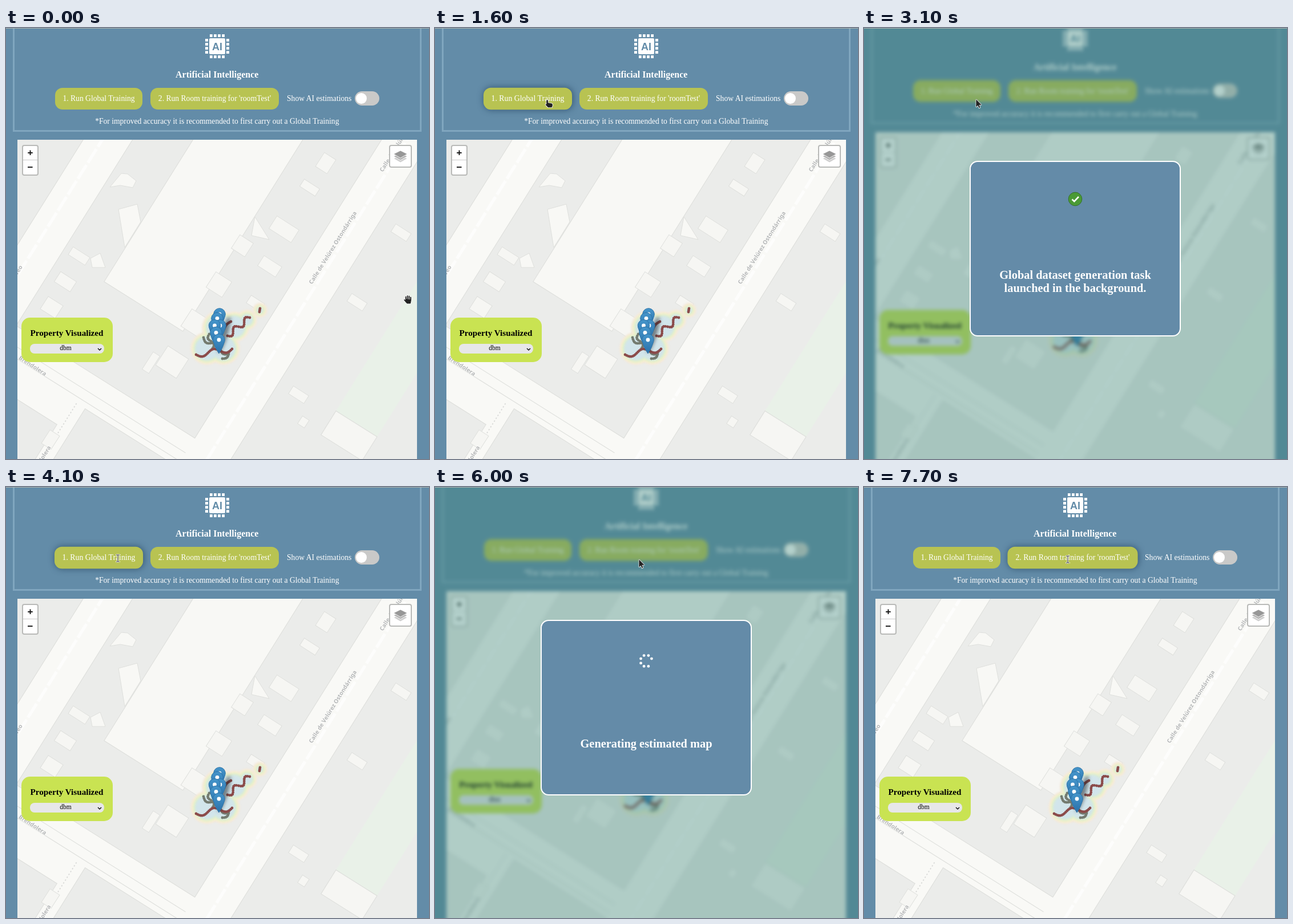
Animation of 741 by 756 pixels, one loop 8 s. Source, as an HTML page with a canvas:

```html
<!DOCTYPE html>
<html lang="en">
<head>
<meta charset="utf-8">
<title>Artificial Intelligence panel</title>
<style>
  html, body { margin: 0; width: 100%; height: 100%; overflow: hidden; background: #638ca8; }
  body { position: relative; font-family: "Liberation Serif", "Times New Roman", serif; font-size: 13.6px; color: #fff; }
  div, canvas, svg { position: absolute; box-sizing: border-box; }
  #page { left: 0; top: 0; width: 741px; height: 790px; background: #638ca8; }
  #page.away { filter: blur(3.4px); transform: translateY(-13.5px); }
  #map { left: 20px; top: 196px; width: 700px; height: 594px; overflow: hidden; }
  #map canvas { left: 0; top: 0; }
  .t { white-space: nowrap; line-height: 1; transform: translate(-50%, -50%); }
  .label { font: 600 10px "Noto Sans", sans-serif; color: #b4b6b6; text-shadow: 0 0 2px #fff, 0 0 2px #fff; }
  .bold { font-weight: bold; }
  .big { font-weight: bold; font-size: 20.4px; }
  .sign { font: bold 17px "Liberation Sans", Arial, sans-serif; color: #111; }
  #frame { left: 12px; top: -8px; width: 716px; height: 190px; border: 3px solid #80a6bf; }
  .btn { top: 104.5px; height: 38px; border-radius: 13px; background: #b8c352; line-height: 38px; text-align: center; white-space: nowrap; }
  .btn.over { transform: scale(1.014); box-shadow: 1px 0 10px 1px rgba(30, 60, 90, .6); }
  #switch { left: 611px; top: 111px; width: 42.5px; height: 25px; border-radius: 13px; background: #c9c9c8; }
  #switch div { left: 2px; top: 3px; width: 19px; height: 19px; border-radius: 50%; background: #fff; }
  .ctl { background: #fff; border: 2px solid #b9bab8; border-radius: 4px; }
  #panel { left: 26.5px; top: 507.5px; width: 160px; height: 78px; border-radius: 15px; background: #c9e352; color: #000; }
  #pick { left: 15px; top: 46px; width: 130px; height: 17px; border-radius: 8px; background: #e7e7e9; }
  #veil { inset: 0; background: rgba(55, 132, 118, .38); }
  #modal { left: 185px; top: 232.5px; width: 370px; height: 308px; border: 2px solid #fff; border-radius: 14px; background: #648ba8; }
  #edge { left: 0; top: 0; width: 100%; height: 1px; background: #aab2ae; }
  #cursor { left: 0; top: 0; overflow: visible; stroke-linecap: round; stroke-linejoin: round; }
</style>
</head>
<body>
<div id="page">
  <div id="frame"></div>
  <svg id="chip" width="42" height="42" style="left:348.5px;top:10.5px" fill="#fff">
    <rect x="7" y="7" width="28" height="28" rx="2"/>
    <text x="21" y="27.5" text-anchor="middle" fill="#638ca8" font-size="18" font-weight="bold" font-family="Liberation Sans, Arial, sans-serif">AI</text>
  </svg>
  <div class="btn" id="b1" style="left:86px;width:153px">1. Run Global Training</div>
  <div class="btn" id="b2" style="left:253px;width:225px">2. Run Room training for 'roomTest'</div>
  <div id="switch"><div></div></div>
  <div id="map"><canvas id="ground" width="700" height="594"></canvas></div>
  <div class="ctl" style="left:28px;top:204.5px;width:29px;height:54px"></div>
  <div style="left:30px;top:231px;width:25px;height:1px;background:#ccc"></div>
  <div class="ctl" style="left:670.5px;top:204.5px;width:40.5px;height:40px"></div>
  <svg width="24" height="24" style="left:679px;top:214px" stroke="#fff" stroke-width=".8">
    <path fill="#cfcfcf" d="M0 15 12 9 24 15 12 22z"/>
    <path fill="#b4b4b4" d="M0 11 12 5 24 11 12 18z"/>
    <path fill="#979797" d="M0 7 12 1 24 7 12 14z"/>
  </svg>
  <div id="panel">
    <div id="pick"></div>
    <svg width="8" height="6" style="left:133px;top:53px" fill="none" stroke="#111" stroke-width="1.5"><path d="M1 1 4 4 7 1"/></svg>
  </div>
</div>
<div id="veil"></div>
<div id="modal">
  <svg id="done" width="30" height="30" style="left:168px;top:50px">
    <circle cx="15" cy="15" r="11.8" fill="#4a9a35" stroke="#34702a"/>
    <path d="M9.5 15.5 13.3 19.2 21 11" fill="none" stroke="#fff" stroke-width="2.6"/>
  </svg>
  <svg id="spin" width="30" height="30" style="left:168px;top:55px" fill="#fff"></svg>
</div>
<div id="edge"></div>
<svg id="cursor" width="1" height="1"></svg>
<script>
const $ = id => document.getElementById(id);
const LOOP = 8000;

function text(parent, x, y, str, cls = '', size = '', turn = 0) {
  const el = document.createElement('div');
  el.className = 't ' + cls;
  el.textContent = str;
  Object.assign(el.style, { left: x + 'px', top: y + 'px', fontSize: size });
  if (turn) el.style.transform = `translate(-50%,-50%) rotate(${turn}deg)`;
  parent.append(el);
  return el;
}

function shape(parent, tag, attrs) {
  const el = document.createElementNS('http://www.w3.org/2000/svg', tag);
  for (const k in attrs) el.setAttribute(k, attrs[k]);
  parent.append(el);
  return el;
}

// Header, panel and dialog
const page = $('page'), modal = $('modal');
text(page, 369.7, 81.5, 'Artificial Intelligence', 'bold', '16px');
text(page, 548.7, 124, 'Show AI estimations');
text(page, 369.8, 164, '*For improved accuracy it is recommended to first carry out a Global Training');
text(page, 42.5, 219, '+', 'sign');
text(page, 42.5, 245, '\u2212', 'sign');
text($('panel'), 80, 27, 'Property Visualized', 'bold', '15.15px');
text($('panel'), 78, 54.5, 'dbm', '', '11.5px');
const doneText = [
  text(modal, 183, 198, 'Global dataset generation task', 'big'),
  text(modal, 183, 221.5, 'launched in the background.', 'big')
];
const waitText = text(modal, 183, 215.5, 'Generating estimated map', 'big');

for (let i = 0; i < 4; i++) {
  const p = 8 + i * 7.1;
  for (const far of [0, 37]) {
    shape($('chip'), 'rect', { x: p, y: far, width: 4.7, height: 5 });
    shape($('chip'), 'rect', { x: far, y: p, width: 5, height: 4.7 });
  }
}

const dots = Array.from({ length: 8 }, (_, i) => {
  const a = (i + .5) * Math.PI / 4;
  return shape($('spin'), 'circle', { cx: 15 + 10.2 * Math.cos(a), cy: 15 + 10.2 * Math.sin(a), r: 2.4 });
});

// Map, drawn in page coordinates
const c = $('ground').getContext('2d');
c.translate(-20, -196);
const PALE = '#f9f9f6', LAND = '#ebecea', LINE = '#dfe0dd', FAR = 900;

function box(x, y, x2, y2, fill, line) {
  c.fillStyle = fill;
  c.fillRect(x, y, x2 - x, y2 - y);
  if (line) { c.strokeStyle = line; c.strokeRect(x, y, x2 - x, y2 - y); }
}
function rule(x, y, x2, y2, color, width, dash = []) {
  c.beginPath();
  c.moveTo(x, y);
  c.lineTo(x2, y2);
  c.strokeStyle = color;
  c.lineWidth = width;
  c.setLineDash(dash);
  c.stroke();
  c.setLineDash([]);
}
function house(x, y, w, h) {
  c.save();
  c.translate(x, y);
  c.rotate(.57);
  box(-w / 2, -h / 2, w / 2, h / 2, '#f6f6f3', LINE);
  c.restore();
}
function poly(d) {
  const p = new Path2D(d);
  c.fillStyle = '#f8f8f5';
  c.fill(p);
  c.strokeStyle = LINE;
  c.stroke(p);
}

function drawGround() {
  // Town grid: first axis runs across the avenues, second along them
  c.save();
  c.transform(1, .63, -.625, 1, 0, 196);
  box(-FAR, -FAR, FAR, FAR, PALE);
  box(-FAR, -FAR, 97, 226, LAND, LINE);
  box(159, -FAR, 472, 226, LAND, LINE);
  box(159, 318, 288, FAR, LAND, LINE);
  box(311, 276, 472, FAR, LAND, LINE);
  box(534, -FAR, FAR, FAR, LAND, LINE);
  box(235, -FAR, 373, 101, '#f8f8f5', LINE);
  box(628, -FAR, 700, 80, '#e9f1e8');
  box(628, 80, 700, 122, '#f6f6f3', LINE);
  for (const mid of [121, 504]) rule(mid, -FAR, mid, FAR, '#fdfdfc', 4.5, [24, 4]);
  for (const side of [252, 267]) rule(0, side, 472, side, LINE, 1);
  rule(296, 276, 296, FAR, '#d8d9d7', 1.5, [2, 3]);
  c.restore();

  c.lineWidth = 1;
  poly('M182 279 202 255 213 256 228 268 222 280 200 276z');
  poly('M197 318 230 309 236 340 208 385z');
  poly('M436 331 461 371 430 364z');
  poly('M148 404 165 395 174 420 151 420z');
  for (let i = 0; i < 3; i++) {
    house(128 - 24 * i, 400 + 45 * i, 35 - i * 2, 16 + 5 * i);
    house(437 + 25 * i, 483 - 65 * i, 28 + 9 * i, 16 + 5 * i);
  }
  for (let i = -1; i < 3; i++) house(332 + 41 * i, 518 - 68 * i, 38 - 5 * i, 36 - 4 * i);
  for (const i of [0, 1, 2.33]) house(692 - 77 * i, 359 + 122 * i, 32, 16);
  house(560, 237, 24, 29);
  house(532, 280, 32, 15);
  house(521, 691, 14, 16);
  house(254, 587, 14, 36);
  house(78, 722, 20, 28);
}

function disc(x, y, r, fill) {
  c.beginPath();
  c.arc(x, y, r, 0, 7);
  c.fillStyle = fill;
  c.fill();
}

// A beaded walk from one point to another, swaying sideways
function trail(x, y, x2, y2, sway, waves, color) {
  const dx = x2 - x, dy = y2 - y, len = Math.hypot(dx, dy), n = Math.ceil(len / 2.6);
  for (let i = 0; i <= n; i++) {
    const p = i / n, s = sway * Math.sin(p * waves * Math.PI) / len;
    disc(x + dx * p - dy * s, y + dy * p + dx * s, 2.4, color);
  }
}

function drawHeat() {
  const hubs = [[352, 562, 29], [381, 562, 29], [374, 526, 31], [400, 524, 27], [422, 512, 18], [445, 495, 13]];
  c.filter = 'blur(1.8px)';
  ['#f5eadc', '#f2efcd', '#e2f0cd', '#d4e8e2', '#d2e5eb'].forEach((color, i) =>
    hubs.forEach(([x, y, r]) => disc(x, y, r - i * 2.6, color)));
  c.filter = 'none';

  const red = '#8b4b4a', grey = '#747b70';
  trail(346, 543, 390, 572, 5, 3, grey);
  trail(356, 537, 362, 562, 4, 2, grey);
  trail(390, 570, 379, 580, -4, 1, grey);
  trail(333, 573, 396, 563, 5, 3, red);
  trail(388, 540, 427, 508, 5, 4, red);
  trail(394, 515, 382, 528, 2, 1, red);
  trail(445, 492, 444, 498, 0, 1, red);
}

function pin(x, y) {
  const g = c.createLinearGradient(0, y - 10, 0, y + 24);
  g.addColorStop(0, '#4595ca');
  g.addColorStop(1, '#2a70aa');
  c.beginPath();
  c.arc(x, y, 10.3, Math.PI * .9, Math.PI * .1);
  c.quadraticCurveTo(x + 7, y + 14, x, y + 24);
  c.quadraticCurveTo(x - 7, y + 14, x - 9.8, y + 3.2);
  c.closePath();
  c.fillStyle = g;
  c.fill();
  c.strokeStyle = '#2e74a8';
  c.stroke();
  disc(x, y, 3.4, '#fff');
}

function drawPins() {
  c.filter = 'blur(3px)';
  c.fillStyle = 'rgba(20,25,30,.5)';
  c.beginPath();
  c.ellipse(382, 538, 6, 33, .3, 0, 7);
  c.fill();
  c.filter = 'none';
  [[374, 502], [370, 509.5], [375, 522], [365.5, 522], [368, 534.5], [373, 547]].forEach(p => pin(...p));
}

drawGround();
drawHeat();
drawPins();

const label = (x, y, str, turn) => text($('map'), x - 20, y - 196, str, 'label', '', turn);
label(572, 385, 'Calle de Velúrez Ostondárriga', -58);
label(696, 188, 'Calle de Velúrez Ostondárriga', -58);
label(47, 592, 'Brendolera', 33);
label(61, 757, 'Brendolera', -58);
label(17, 431, 'Tarveo', -58);

// Cursors: a white halo under a dark outline, hot spot at 0,0
function cursor(d, width, fill) {
  const g = shape($('cursor'), 'g', {});
  shape(g, 'path', { d, fill: 'none', stroke: '#fff', 'stroke-width': width + 1.6 });
  shape(g, 'path', { d, fill, stroke: '#222', 'stroke-width': width });
  return g;
}
const cursors = {
  arrow: cursor('M.7 1V13L3.6 10.4 5.8 15 7.2 14.4 5.2 9.7H9.2Z', .6, '#222'),
  point: cursor('M-.5 2.3Q.7 0 1.8 2.4V6.5L8 7.5Q10.2 8.3 9.6 11L8.5 14H2L-2.2 9.5Q-2 8.5-.5 9Z', .6, '#222'),
  grab: cursor('M-3.5 0V-4.5M-.6-1V-6M2.3-1V-5.5M5 1V-3.5M-6 1-3.5 4M-3.5 0V4L-1 6.5H4L5 1Z', 1.9, '#222'),
  beam: cursor('M-2.5-6H-.6L0-5.4 .6-6H2.5M0-5.4V5.4M-2.5 6H-.6L0 5.4 .6 6H2.5', 1, 'none')
};

// Timeline
const START = [704, 476], ONE = [196, 125], TWO = [357, 127];
const ease = p => p * p * (3 - 2 * p);
function glide(a, b, t, start) {
  const p = ease(Math.min(1, Math.max(0, (t - start + 100) / 900)));
  return a.map((v, i) => v + (b[i] - v) * p);
}
const show = (el, on) => { el.style.display = on ? '' : 'none'; };
const inside = (x, y, left, right) => x > left && x < right && y > 104 && y < 143;

function draw(t) {
  const done = t >= 2100 && t < 4100, wait = t >= 6000 && t < 7700, open = done || wait;
  const [x, y] = t < 4100 ? glide(START, ONE, t, 300) : glide(ONE, TWO, t, 4600);
  const on1 = !open && inside(x, y, 86, 239), on2 = !open && inside(x, y, 253, 478);

  page.classList.toggle('away', open);
  $('b1').classList.toggle('over', on1);
  $('b2').classList.toggle('over', on2);
  show($('veil'), open);
  show(modal, open);
  [$('done'), ...doneText].forEach(el => show(el, done));
  [$('spin'), waitText].forEach(el => show(el, wait));
  const gap = (t / 100 + 4) % 8;
  dots.forEach((d, i) => show(d, i !== gap));

  const beam = (t >= 4100 && t < 4200) || t >= 7700;
  const kind = open ? 'arrow' : beam ? 'beam' : on1 || on2 ? 'point' : y > 196 ? 'grab' : 'arrow';
  for (const k in cursors) show(cursors[k], k === kind);
  $('cursor').style.transform = `translate(${x}px,${y}px)`;
}

const begin = performance.now();
function tick() {
  const t = (performance.now() - begin) % LOOP;
  draw(Math.floor(t / 100) * 100);
  requestAnimationFrame(tick);
}
tick();
</script>
</body>
</html>
```
